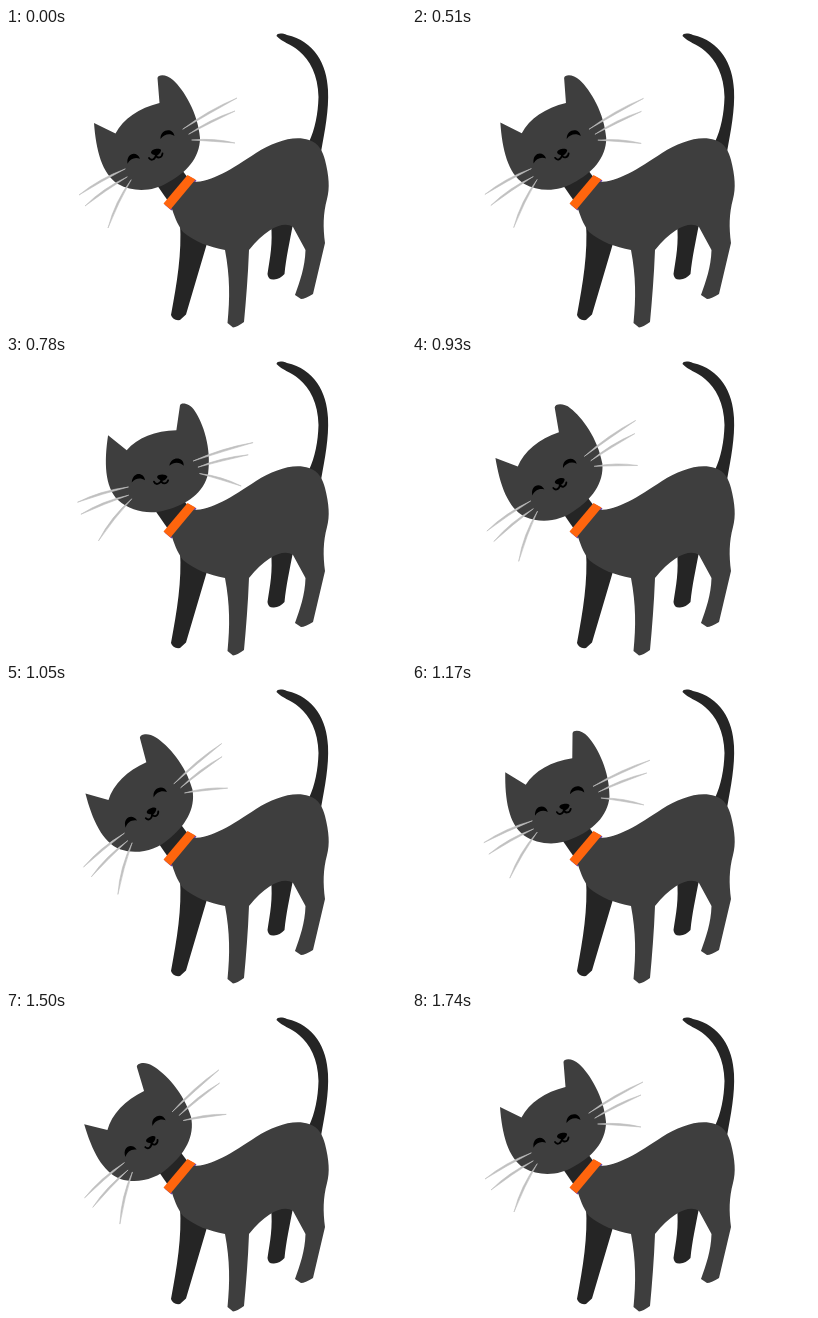
Animation of 400x300 px, one loop 1800 ms. Source, as an HTML page with a canvas:

```html
<!DOCTYPE html>
<html lang="en">
<head>
<meta charset="utf-8">
<title>Happy cat</title>
<style>
html, body { margin: 0; width: 100%; height: 100%; overflow: hidden; background: #fff; }
canvas { display: block; width: 400px; height: 300px; }
</style>
</head>
<body>
<canvas id="stage" width="400" height="300"></canvas>
<script>
const ctx = document.getElementById('stage').getContext('2d');
const LOOP = 1800, STEP = 30;
const FUR = '#3e3e3e', SHADE = '#252525', ORANGE = '#ff650d', PURPLE = '#6c3fa8';
const WHISKER = '#c0c0c0';
const PIVOT = [165, 150];

// Head tilt in degrees at key times, eased between them
const SWING = [[0, 0], [480, 0], [765, 13], [1015, -11.4], [1265, 12.8], [1515, -12.3], [1740, 0], [LOOP, 0]];

const shapes = {
  tail: new Path2D('M270.500 8C271 5 276 5 281 7C308 13 321 36 322 62C323 82 319 102 315 124L303 114C309 101 312 86 312.500 69C312 47 304 32 293 23C285 16 276 14 270.500 8Z'),
  hindLeg: new Path2D('M265 196C267 215 264 230 261.500 246Q262 252 268 251.500Q274 251 278.500 246C280 230 284 212 287 196Z'),
  frontLeg: new Path2D('M174 195C176 225 171 255 165 287Q167 293 174 292L180 286.500L202 212Z'),
  body: new Path2D('M187 154C206 154 226 141 250 125C268 114 287 107 303 112C313 115 317 124 319 132C323 148 324 160 321 171C317 186 317 199 319 215L307 266Q299 271 295 271L289 267C294 253 299 239 299.500 222L287 199C278 193 262 199 243 222C242 248 240 272 238 294Q231 299 227 299.500L221.500 295C224 270 224 249 219 222C203 219 189 214 177 204C171 196 168 187 165 178Z'),
  neck: new Path2D('M149.500 155L162 173L182 150L171.500 136Z'),
  collar: new Path2D('M181.500 147L189.500 151.500L164.500 181.500L157.500 175.500Z'),
  head: new Path2D('M88 95L109.500 105.500C117 91 133 80 153.500 75L151.500 50C152 46 161 46 167 52C178 62 192 85 194 110C194 130 180 145 161 155C148 163 128 165 112 156C96 146 90 122 88 95Z'),
  eyes: new Path2D('M154.500 111C154 101 167 99 168.500 108C164 105 158 106 154.500 111ZM121.500 135.700C120 124.700 131 122.700 134 130.700C129 128.700 124 130.700 121.500 135.700Z'),
  nose: new Path2D('M145 124.500C145 121.500 153 119.500 155 122C155 124 153 127 150.500 127.500C148 127 145 126 145 124.500Z'),
  mouth: new Path2D('M143 130C145 133 149 132 150 127C151 131 156 130 156.500 125.500')
};

// Root, bend and tip of each whisker
const WHISKERS = [
  [177, 101, 203, 83.5, 231, 70],
  [183, 106, 204, 93, 229, 83],
  [186, 112, 208, 111.5, 229, 115],
  [119, 141, 94, 152, 73, 167],
  [121, 149, 98, 161.5, 79, 178],
  [125, 152, 110.5, 174, 102, 200]
];

function fill(path, color) {
  ctx.fillStyle = color;
  ctx.fill(path);
}

function whisker([x0, y0, cx, cy, x1, y1]) {
  const len = Math.hypot(x1 - x0, y1 - y0);
  const nx = -(y1 - y0) / len * 1.8, ny = (x1 - x0) / len * 1.8;
  ctx.beginPath();
  ctx.moveTo(x0, y0);
  ctx.quadraticCurveTo(cx + nx, cy + ny, x1, y1);
  ctx.quadraticCurveTo(cx - nx, cy - ny, x0, y0);
  ctx.fillStyle = ctx.strokeStyle = WHISKER;
  ctx.lineWidth = 0.6;
  ctx.fill();
  ctx.stroke();
}

function tiltAt(t) {
  const i = SWING.findIndex(key => key[0] > t);
  const [t0, a] = SWING[i - 1], [t1, b] = SWING[i];
  return a + (b - a) * (1 - Math.cos(Math.PI * (t - t0) / (t1 - t0))) / 2;
}

function drawBody() {
  fill(shapes.tail, SHADE);
  fill(shapes.hindLeg, SHADE);
  fill(shapes.frontLeg, SHADE);
  ctx.save();
  ctx.translate(1, 1);
  fill(shapes.collar, PURPLE);
  ctx.restore();
  fill(shapes.body, FUR);
  fill(shapes.neck, SHADE);
  fill(shapes.collar, ORANGE);
}

function drawHead(tilt) {
  ctx.save();
  ctx.translate(...PIVOT);
  ctx.rotate(tilt * Math.PI / 180);
  ctx.translate(-PIVOT[0], -PIVOT[1]);
  fill(shapes.head, FUR);
  fill(shapes.eyes, '#000');
  fill(shapes.nose, '#000');
  ctx.strokeStyle = '#000';
  ctx.lineWidth = 1.8;
  ctx.lineCap = 'round';
  ctx.stroke(shapes.mouth);
  WHISKERS.forEach(whisker);
  ctx.restore();
}

function draw(time) {
  const t = Math.floor((time % LOOP) / STEP) * STEP;
  ctx.fillStyle = '#fff';
  ctx.fillRect(0, 0, 400, 300);
  drawBody();
  drawHead(tiltAt(t));
}

let start;
function tick(now) {
  if (start === undefined) start = now;
  draw(Math.max(0, now - start));
  requestAnimationFrame(tick);
}
draw(0);
requestAnimationFrame(tick);
</script>
</body>
</html>
```
